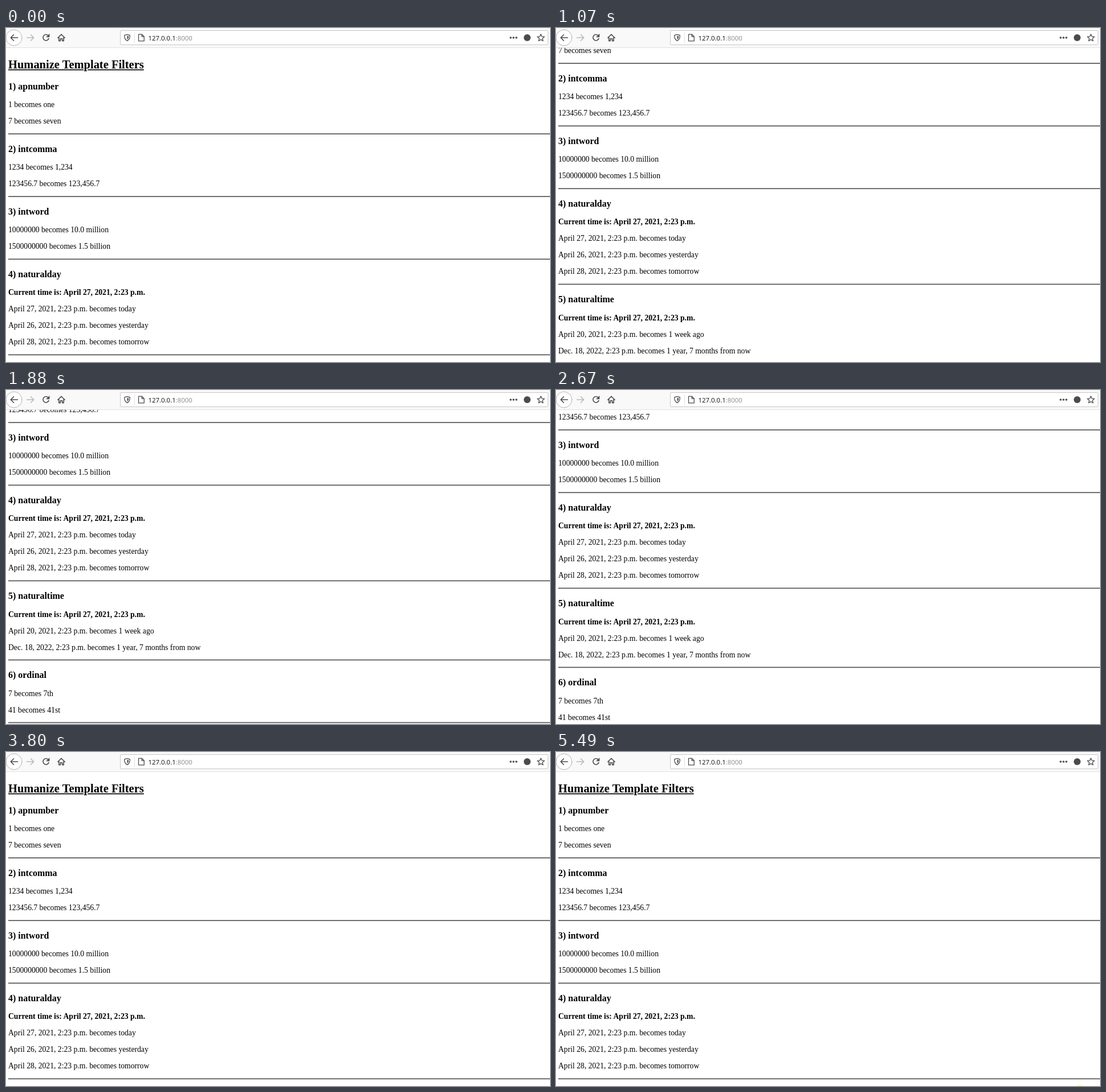
An HTML page for the animation above (5630 ms loop, 954 by 587 pixels).

```html
<!DOCTYPE html>
<html lang="en">
<head>
<meta charset="utf-8">
<title>Humanize Template Filters</title>
<style>
  html, body { margin: 0; width: 100%; height: 100%; overflow: hidden; background: #fff; }
  #stage { position: absolute; left: 0; top: 0; width: 954px; height: 587px; overflow: hidden; }
  #view { position: absolute; left: 0; top: 35px; width: 954px; height: 552px; overflow: hidden; }
  #page {
    position: absolute; left: 4px; top: 17.7px; width: 1120px;
    transform-origin: 0 0; color: #000;
    font: 16px/18px "Liberation Serif", "Times New Roman", serif;
  }
  h2 { font-size: 24px; line-height: 27px; margin: 0 0 19.92px; }
  h3 { font-size: 18.72px; line-height: 21.5px; margin: 18.72px 0; }
  p { margin: 16px 0; }
  hr { height: 2px; margin: 8px 0; border: 0; background: #555; }
  svg { position: absolute; left: 0; top: 0; }
  .url { font: 11.4px "Open Sans", "Noto Sans", sans-serif; }
</style>
</head>
<body>
<div id="stage">
  <div id="view"><div id="page"></div></div>
  <svg width="954" height="587" fill="none" stroke="#4a4a4f" stroke-width="1.6" stroke-linecap="round" stroke-linejoin="round">
    <rect width="954" height="34" fill="#f9f9fa" stroke="none"/>
    <path d="M0 34.5H954" stroke="#e1e1e2" stroke-width="1"/>
    <circle cx="14" cy="17" r="14" fill="#fff" stroke="#b4b4b6" stroke-width="1"/>
    <path id="arrow" d="M20.5 17H8.5M13.5 11.8L8.3 17L13.5 22.2"/>
    <path d="M36.5 17H48.5M43.5 11.8L48.7 17L43.5 22.2" stroke="#b9b9bb"/>
    <path d="M74.3 13.6A5.2 5.2 0 1 0 75 18.6"/>
    <path d="M76 11V15.8H71.2Z" fill="#4a4a4f" stroke-width=".8"/>
    <path d="M90.8 17.3L97 11.2L103.2 17.3M92.8 16.5V22.6H95.4V18.8H98.6V22.6H101.2V16.5"/>
    <rect x="200.5" y="4.5" width="750" height="25" rx="1" fill="#fff" stroke="#c6c6c8" stroke-width="1"/>
    <path d="M212.5 11.4L217.3 12.8C217.5 17.6 216 20.8 212.5 22.6C209 20.8 207.5 17.6 207.7 12.8Z" stroke-width="1.3"/>
    <path d="M212.5 13.8V20.2C214.4 18.8 215.2 17 215.2 14.6Z" fill="#4a4a4f" stroke="none"/>
    <path d="M225.5 8V26" stroke="#e0e0e2" stroke-width="1"/>
    <path d="M232.5 11.2H238.3L242.2 15V22.8H232.5ZM238.2 11.5V15.2H242" stroke-width="1.3"/>
    <text class="url" x="249.5" y="21.8" fill="#0c0c0d" stroke="none">127.0.0.1<tspan fill="#8a8a8c">:8000</tspan></text>
    <g fill="#4a4a4f" stroke="none">
      <circle cx="885" cy="17" r="1.8"/><circle cx="890" cy="17" r="1.8"/><circle cx="895" cy="17" r="1.8"/>
      <circle cx="914" cy="17" r="6"/>
    </g>
    <path id="star" stroke-width="1.3"/>
    <circle id="pointer" r="10" fill="#ffff80" stroke="none"/>
  </svg>
</div>
<script>
const $ = id => document.getElementById(id);
const now = "April 27, 2021, 2:23 p.m.";
const current = `<b>Current time is: ${now}</b>`;
const sections = {
  apnumber: ["1 becomes one", "7 becomes seven"],
  intcomma: ["1234 becomes 1,234", "123456.7 becomes 123,456.7"],
  intword: ["10000000 becomes 10.0 million", "1500000000 becomes 1.5 billion"],
  naturalday: [current, `${now} becomes today`,
    "April 26, 2021, 2:23 p.m. becomes yesterday", "April 28, 2021, 2:23 p.m. becomes tomorrow"],
  naturaltime: [current, "April 20, 2021, 2:23 p.m. becomes 1 week ago",
    "Dec. 18, 2022, 2:23 p.m. becomes 1 year, 7 months from now"],
  ordinal: ["7 becomes 7th", "41 becomes 41st"],
};
$("page").innerHTML = "<h2><u>Humanize Template Filters</u></h2>" +
  Object.entries(sections).map(([name, lines], i) =>
    `<h3>${i + 1}) ${name}</h3>` + lines.map(line => `<p>${line}</p>`).join("") + "<hr>").join("");

const starPoints = Array.from({ length: 10 }, (_, i) => {
  const r = i % 2 ? 3 : 6.6, a = i * Math.PI / 5;
  return [938 + r * Math.sin(a), 17.4 - r * Math.cos(a)];
});
$("star").setAttribute("d", "M" + starPoints.join("L") + "Z");

const LOOP = 5630, TICK = LOOP / 120, NOTCH = 48.7, SCALE = 0.8533;
// Wheel notches: start tick, length in ticks, direction
const notches = [
  [4.7, 4, 1], [9.46, 4, 1], [20.7, 7, 1], [27.64, 4, 1], [37.2, 4, 1],
  [56.2, 4, -1], [65.5, 4, -1], [66.7, 4, -1], [67.75, 4, -1], [77.2, 3.8, -1],
];
const easeOut = p => 1 - (1 - Math.min(1, Math.max(0, p))) ** 2;
const scrollAt = tick => Math.round(NOTCH * notches.reduce(
  (sum, [start, length, dir]) => sum + dir * easeOut((tick - start) / length), 0));

function pointerAt(tick) {
  if (tick >= 117) return [918, 595];
  if (tick < 103 || tick > 108) return [918, 620];
  const p = (tick - 103) / 5;
  return [939 - 11 * p, 576 + 10 * (2 * p - 1) ** 2];
}

function draw() {
  const tick = Math.floor((performance.now() % LOOP + 15) / TICK) % 120;
  $("page").style.transform = `translateY(${-scrollAt(tick)}px) scale(${SCALE})`;
  const [x, y] = pointerAt(tick);
  $("pointer").setAttribute("cx", x);
  $("pointer").setAttribute("cy", y);
  requestAnimationFrame(draw);
}
draw();
</script>
</body>
</html>
```
